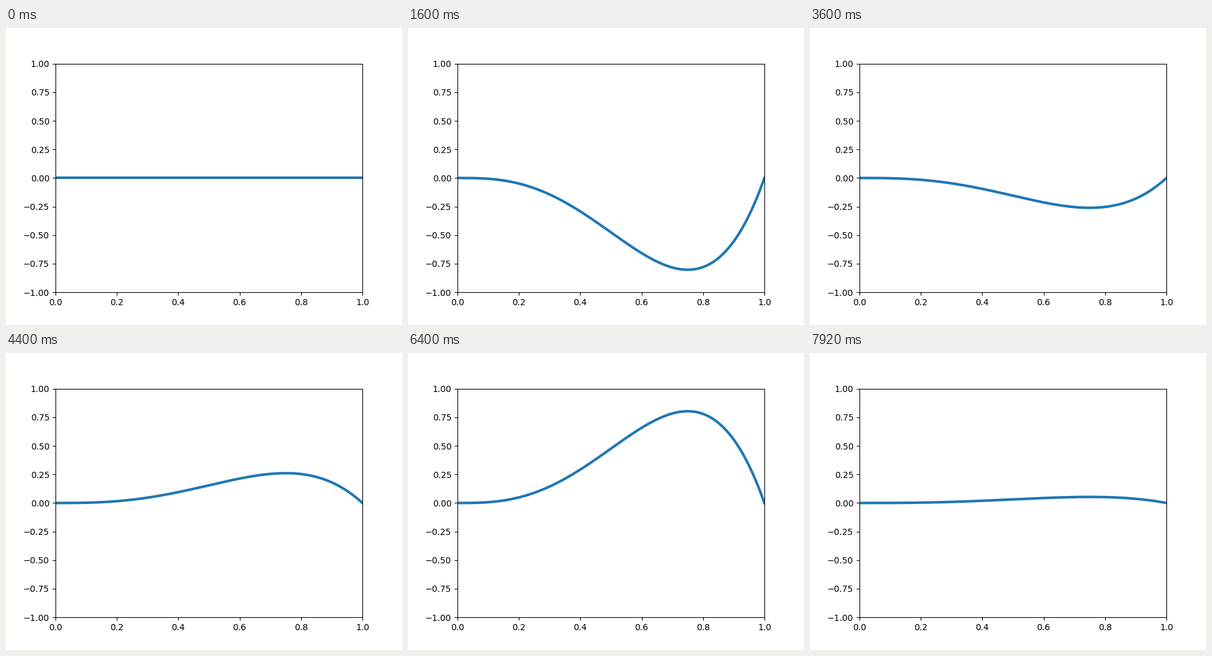
Recreate the animation shown at these times as a matplotlib script. Size 640 by 480 pixels, loop 8000 ms.

```python
import numpy as np
import matplotlib.pyplot as plt
from matplotlib.animation import FuncAnimation

FRAMES = 100
INTERVAL = 80  # ms

fig, ax = plt.subplots(figsize=(6.4, 4.8), dpi=100)
ax.set_xlim(0, 1)
ax.set_ylim(-1, 1)

x = np.linspace(0, 1, 1000)
shape = 8 * x**3 * (1 - x)
line, = ax.plot(x, np.zeros_like(x), color="#1f77b4", lw=3)


def update(i):
    """Swing the fixed curve shape through one sine period."""
    line.set_ydata(-np.sin(2 * np.pi * i / FRAMES) * shape)
    return line,


anim = FuncAnimation(fig, update, frames=FRAMES, interval=INTERVAL,
                     repeat=True, repeat_delay=0)
plt.show()
```
